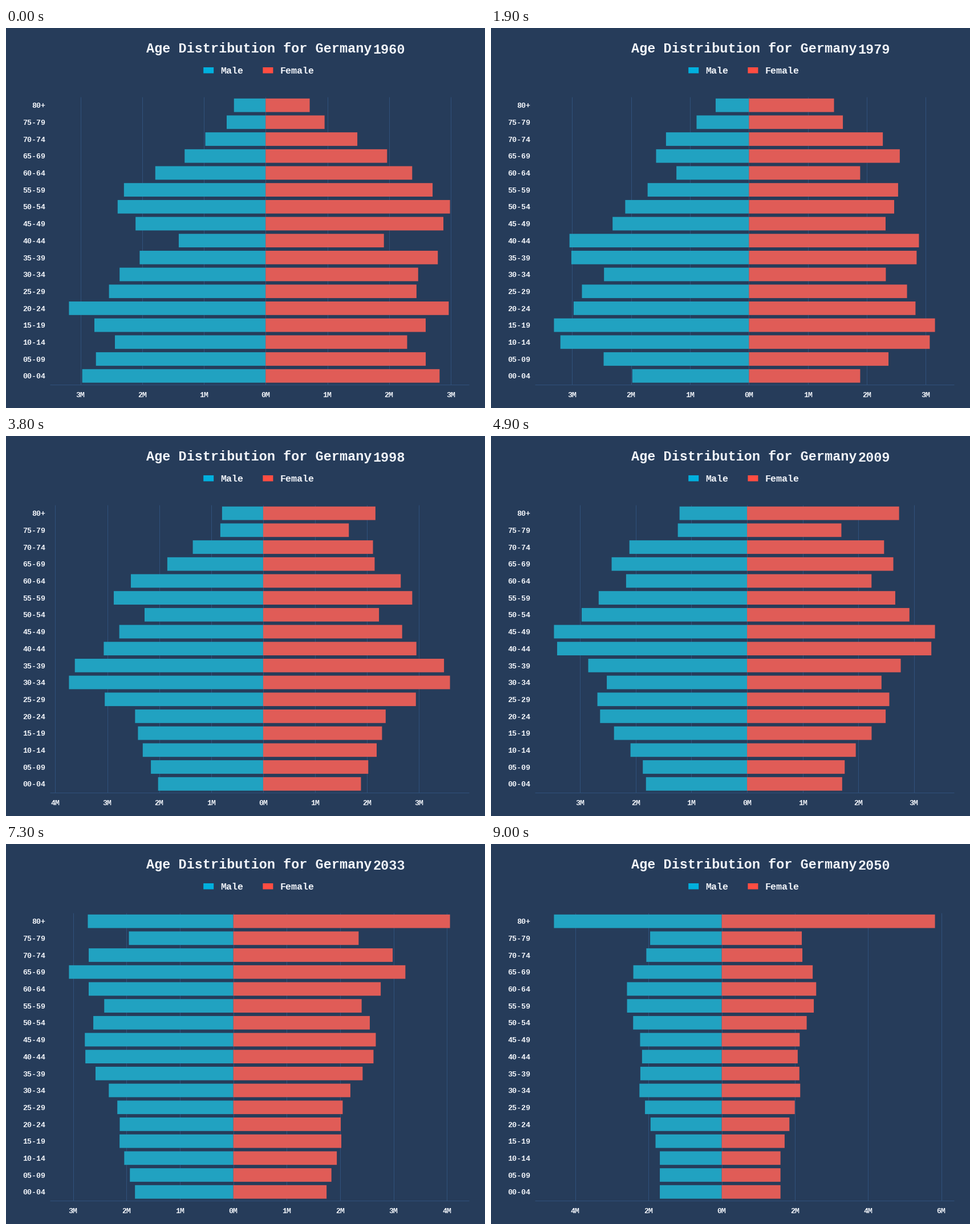
Animation, 840 px wide and 667 px high, one loop 9100 ms. Source, as a matplotlib script:

```python
import matplotlib.pyplot as plt
import numpy as np
from matplotlib.animation import FuncAnimation
from matplotlib.patches import Rectangle

W, H = 840, 667
BG, GRID, INK = "#263c5a", "#30517b", "#f2f5fa"
MALE_BAR, FEMALE_BAR = "#21a2c1", "#e05c57"
LEFT, RIGHT, TOP, BOTTOM = 77, 812, 120.8, 626
PITCH, BAR = 29.69, 23.75
PAD = (RIGHT - LEFT) / 22
START = 1960

AGES = np.arange(2.5, 105, 5)
LABELS = [f"{a:02d}-{a + 4:02d}" for a in range(0, 80, 5)] + ["80+"]


def curve(*points):
    xs, ys = zip(*points)
    return lambda x: np.interp(x, xs, ys)


# Turning points by birth year: women per five-year cohort (thousands),
# men per woman, and the share of a cohort that immigrates as young adults
cohort = curve(
    (1885, 2150), (1892, 2400), (1908, 3090), (1912.5, 2920), (1915.5, 2130),
    (1917.5, 1930), (1922.5, 2800), (1926.5, 2510), (1931.5, 2340),
    (1937.5, 3010), (1941, 2930), (1945.5, 2250), (1951, 2700), (1956, 2900),
    (1961, 3390), (1965.5, 3430), (1971, 2800), (1976, 2410), (1982, 2640),
    (1986, 2690), (1991, 2630), (2002, 2150), (2007, 2080), (2017, 2170),
    (2037, 1605))
sex_ratio = curve(
    (1885, 0.97), (1892, 0.88), (1903, 0.97), (1912, 0.77), (1922.5, 0.745),
    (1925.5, 0.84), (1928, 1.0), (1936, 1.08), (1970, 1.04), (1995, 1.075),
    (2015, 1.055))
arrivals = curve(
    (1930, 0), (1942, 0.07), (1968, 0.03), (1975, 0.18), (1990, 0.25),
    (2006, 0.19), (2015, 0.11), (2035, 0))


def sigmoid(x):
    return 1 / (1 + np.exp(-x))


def survival(age, born, base, gain, low, high, spread):
    """Gompertz curve whose modal age of death rises with birth year."""
    mode = np.clip(base + gain * (born - 1897), low, high)
    return np.exp(-np.exp((age - mode) / spread))


def population(year):
    """Men and women in millions per age group, youngest first."""
    born = year - AGES
    size = cohort(born) / 1000
    size *= 1 - arrivals(born) * sigmoid((19 - AGES) / 4.5)
    # Immigration wave of the 1990s
    size *= 1 - 0.05 * np.clip((born - 1950) / 12, 0, 1) * sigmoid((1993 - year) / 2)
    size *= 1 + 0.055 * np.exp(-((year - 1998) / 7) ** 2 - ((AGES - 33) / 12) ** 2)

    men = size * sex_ratio(born) * survival(AGES, born, 75.5, 0.19, 75.5, 89, 11.2)
    women = size * survival(AGES, born, 81.6, 0.16, 78, 91, 8.5)
    # Mortality flattens out past 80
    old_men = 1.12 * men[16:].sum()
    old_women = (1.12 + 0.0022 * (2050 - year)) * women[16:].sum()
    return np.append(men[:16], old_men), np.append(women[:16], old_women)


fig = plt.figure(figsize=(W / 100, H / 100), dpi=100, facecolor=BG)
ax = fig.add_axes([0, 0, 1, 1])
ax.set(xlim=(0, W), ylim=(H, 0))
ax.axis("off")


def label(x, y, text, px, ha="left"):
    return ax.text(x, y, text, fontsize=px * 0.72, ha=ha, va="baseline",
                   color=INK, family="Liberation Mono", weight="bold")


def rect(x, y, w, h, color):
    return ax.add_patch(Rectangle((x, y), w, h, fc=color, lw=0, zorder=3, snap=False))


def line(xs, ys):
    return ax.plot(xs, ys, color=GRID, lw=0.72, zorder=1, solid_capstyle="butt")[0]


label(246, 43.5, "Age Distribution for Germany", 23.5)
year_text = label(643.5, 45, "", 23.5)
for x, name, color in [(346.2, "Male", "#00b0de"), (450.4, "Female", "#ff4d42")]:
    rect(x, 69, 18, 10.5, color)
    label(x + 30.3, 80, name, 16.6)
line([LEFT, RIGHT], [BOTTOM, BOTTOM])

male_bars, female_bars = [], []
for row, name in enumerate(LABELS):
    mid = TOP + PITCH * (16.5 - row)
    label(69, mid + 4.7, name, 13.3, "right")
    male_bars.append(rect(0, mid - BAR / 2, 0, BAR, MALE_BAR))
    female_bars.append(rect(0, mid - BAR / 2, 0, BAR, FEMALE_BAR))

ticks = [(line([0, 0], [TOP, BOTTOM]), label(0, 648.5, "", 13.3, "center"))
         for _ in range(12)]


def update(frame):
    year = START + frame
    year_text.set_text(str(year))
    men, women = population(year)

    # The longest bar on each side always reaches the padded edge
    scale = (RIGHT - LEFT - 2 * PAD) / (men.max() + women.max())
    zero = LEFT + PAD + men.max() * scale
    for mb, fb, m, f in zip(male_bars, female_bars, men * scale, women * scale):
        mb.set_x(zero - m)
        mb.set_width(m)
        fb.set_x(zero)
        fb.set_width(f)

    step = 1 if (RIGHT - LEFT) / scale <= 10 else 2
    first = int(np.ceil((LEFT - zero) / scale / step)) * step
    for k, (grid, text) in enumerate(ticks):
        value = first + k * step
        x = zero + value * scale
        grid.set_visible(x <= RIGHT)
        text.set_visible(x <= RIGHT)
        grid.set_xdata([x, x])
        text.set_x(x)
        text.set_text(f"{abs(value)}M")
    return []


anim = FuncAnimation(fig, update, frames=91, interval=100, repeat=True)
plt.show()
```
